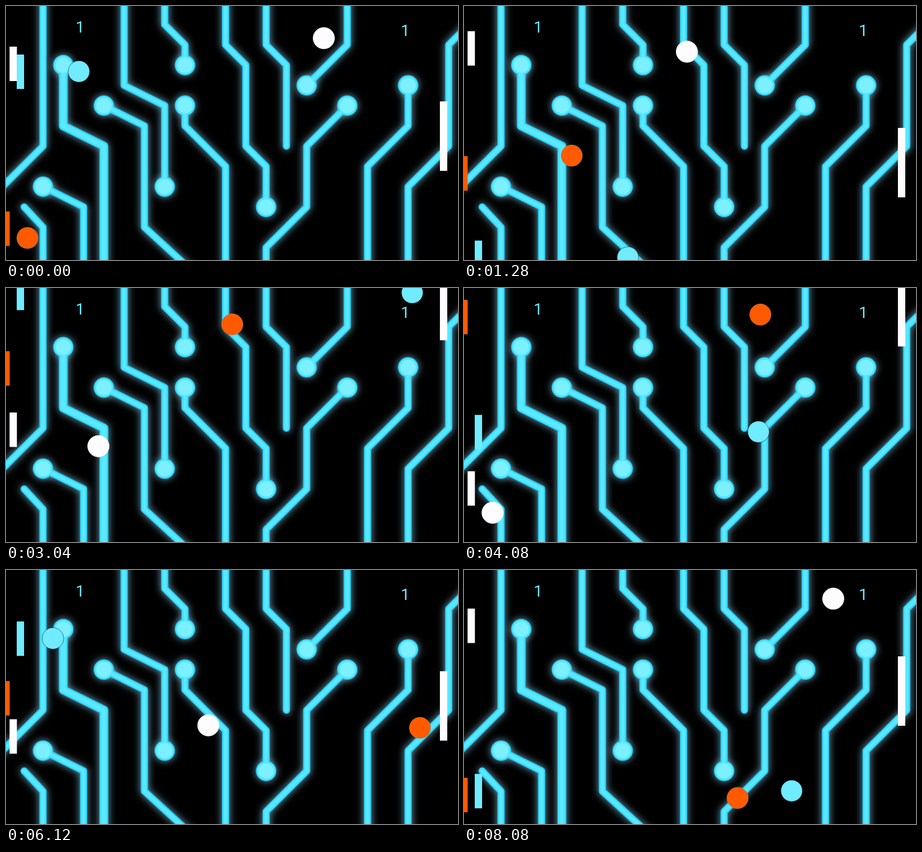
Write an HTML page with a canvas that moves like this. It is 800 px wide and 450 px high and loops after 8120 ms.

```html
<!DOCTYPE html>
<html lang="en">
<head>
<meta charset="utf-8">
<title>Circuit pong</title>
<style>
  html, body { margin: 0; width: 100%; height: 100%; overflow: hidden; background: #000; }
  canvas { display: block; width: 800px; height: 450px; }
</style>
</head>
<body>
<canvas id="stage" width="800" height="450"></canvas>
<script>
const W = 800, H = 450, STEP = 40, LOOP = 8120;
const CYAN = '#70ebff', ORANGE = '#ff5a00', WHITE = '#fffcff';
const TOP = -3.5, BOTTOM = 453.5, RIGHT = 750.7;
const ctx = document.getElementById('stage').getContext('2d');

// Circuit corners in grid cells; "o" marks a round pad.
const CELL = 35.9;
const boldTrace = '2,3o 2,6 4,7 4,14';
const traces = [
  '1,-1 1,7 -1,9',
  '5,-1 5,4 7,5 7,9o',
  '4,5o 6,6 6,11 8.5,13.3',
  '7,-1 7,1 8,2 8,3o',
  '8,5o 8,6 10,8 10,14',
  '10,-1 10,2 11,3 11,7 12,8 12,10o',
  '12,-1 12,2 13,3 13,7',
  '16,-1 16,2 14,4o',
  '16,5o 14,7 14,10 12,12 12,14',
  '19,4o 19,6 17,8 17,14',
  '22,1 21,2 21,7 19,9 19,14',
  '1,9o 3,10 3,14',
  '0.07,10 1,11 1,14'
];

function disc(c, x, y, r) {
  c.beginPath();
  c.arc(x, y, r, 0, Math.PI * 2);
  c.fill();
}

function parse(trace) {
  return trace.split(' ').map(p => {
    const [i, j] = p.split(',').map(parseFloat);
    return { x: 29.6 + CELL * i, y: -3 + CELL * j, pad: p.endsWith('o') };
  });
}

function makeBoard() {
  const board = document.createElement('canvas');
  board.width = W;
  board.height = H;
  const c = board.getContext('2d');
  const thin = traces.map(parse), bold = parse(boldTrace);
  const pads = [...thin, bold].flat().filter(p => p.pad);
  c.fillStyle = '#000';
  c.fillRect(0, 0, W, H);
  c.lineCap = c.lineJoin = 'round';

  const line = (points, width) => {
    c.lineWidth = width;
    c.beginPath();
    points.forEach(p => c.lineTo(p.x, p.y));
    c.stroke();
  };
  const layer = (color, width, radius) => {
    c.strokeStyle = c.fillStyle = color;
    thin.forEach(points => line(points, width));
    line(bold, width + 3);
    pads.forEach(p => disc(c, p.x, p.y, radius));
  };
  c.shadowColor = 'rgba(140,200,225,.8)';
  c.shadowBlur = 14;
  layer('#1da9cf', 13.2, 18.2);
  c.shadowBlur = 0;
  layer('#30d3f6', 11.5, 17.6);
  layer('#48e2ff', 9, 16.5);
  layer('#5ae9ff', 5, 15);
  c.fillStyle = '#7cf0ff';
  pads.forEach(p => disc(c, p.x, p.y, 13.5));

  c.fillStyle = CYAN;
  c.font = '400 28px Roboto, Inter, sans-serif';
  c.textAlign = 'center';
  c.fillText('1', 131, 47);
  c.fillText('1', 706.5, 53);
  return board;
}

// Speeds lists the [horizontal, vertical] pace before and after each paddle hit.
const balls = [
  { color: WHITE, rim: WHITE, x: 562.5, y: 57, dx: -1, dy: -1, left: 38,
    speeds: [[5.25, 4.53], [6.03, 4.58]],
    paddle: { x: 6.3, y: 102, pace: 4 } },
  { color: CYAN, rim: 'rgba(0,30,40,.75)', x: 129, y: 116, dx: -1, dy: 1, left: 44.5,
    speeds: [[12, 10.3], [9.75, 10.3], [10.1, 10.4], [10.14, 10.6]],
    paddle: { x: 19, y: 116, pace: 20 } },
  { color: ORANGE, rim: 'rgba(130,160,145,.5)', x: 38, y: 411, dx: 1, dy: -1, left: 26,
    speeds: [[4.77, 4.56], [5.07, 4.56]],
    paddle: { x: -6.5, y: 394, pace: 3.5 } }
];

function move(ball) {
  const [vx, vy] = ball.speeds[0];
  ball.x += ball.dx * vx;
  ball.y += ball.dy * vy;
  const wall = ball.dx < 0 ? ball.left : RIGHT;
  if ((ball.x - wall) * ball.dx > 0) {
    ball.x = 2 * wall - ball.x;
    ball.dx *= -1;
    if (ball.speeds.length > 1) ball.speeds.shift();
  }
  const edge = ball.dy < 0 ? TOP : BOTTOM;
  if ((ball.y - edge) * ball.dy > 0) {
    ball.y = 2 * edge - ball.y;
    ball.dy *= -1;
  }
  const { paddle } = ball;
  const gap = ball.y - paddle.y;
  paddle.y += Math.max(-paddle.pace, Math.min(paddle.pace, gap));
}

// Play the whole round once, so each picture depends on the time alone.
const rounds = Array.from({ length: LOOP / STEP }, () => {
  const now = balls.map(b => ({ x: b.x, y: b.y, paddleY: b.paddle.y }));
  balls.forEach(move);
  return now;
});

// The right paddle is steered by hand through a few places.
const steering = [[0, 230.5], [32, 277.5], [76, 31], [102, 42], [133, 194.5], [149, 250], [174, 192.5], [202, 214.5]];

function steer(n) {
  const i = Math.max(1, steering.findIndex(([step]) => step >= n));
  const [n0, y0] = steering[i - 1], [n1, y1] = steering[i];
  return y0 + (y1 - y0) * (n - n0) / (n1 - n0);
}

const board = makeBoard();

function paddle(color, x, mid, height) {
  ctx.fillStyle = color;
  ctx.fillRect(x, mid - height / 2, 13, height);
}

function draw(n) {
  const now = rounds[n];
  ctx.drawImage(board, 0, 0);
  balls.forEach((b, i) => paddle(b.color, b.paddle.x, now[i].paddleY + 0.5, 61));
  paddle(WHITE, 768, steer(n), 123);
  ctx.lineWidth = 0.8;
  balls.forEach((b, i) => {
    ctx.fillStyle = b.color;
    ctx.strokeStyle = b.rim;
    disc(ctx, now[i].x, now[i].y, 19);
    ctx.stroke();
  });
}

const start = performance.now();
function tick() {
  const t = Math.max(0, performance.now() - start) % LOOP;
  draw(Math.floor(t / STEP));
  requestAnimationFrame(tick);
}
tick();
</script>
</body>
</html>
```
